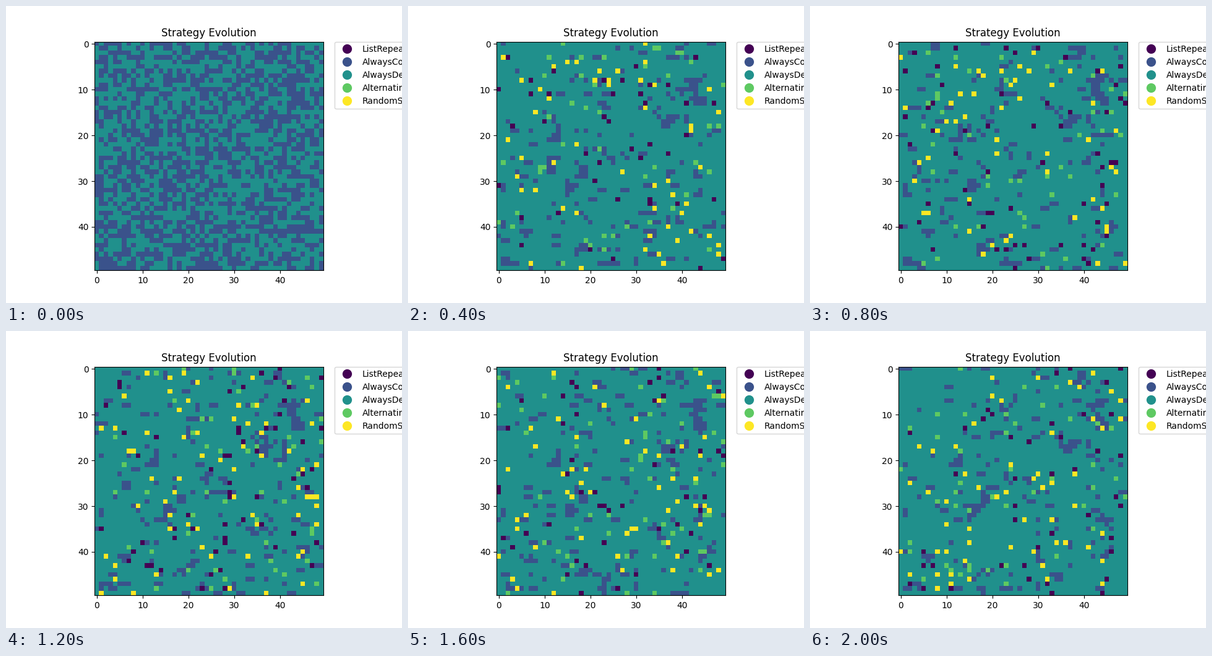
Write a matplotlib script that moves like this. It is 640 px wide and 480 px high and loops after 2.2 s.

```python
import numpy as np
import matplotlib.pyplot as plt
from matplotlib.animation import FuncAnimation

N, FRAMES = 50, 11
LIST, COOP, DEFECT, ALTER, RANDOM = range(5)
LABELS = ["ListRepeater", "AlwaysCooperate", "AlwaysDefect",
          "Alternating", "RandomStrategy"]

rng = np.random.default_rng(12)


def chance(p):
    return rng.random((N, N)) < p


def streaks(p):
    """Sparse cells, some of them widened to the right."""
    cells = chance(p)
    wide = cells & chance(0.45)
    cells[:, 1:] |= wide[:, :-1]
    return cells


def neighbours(cells):
    """How many of the eight cells around each one are set."""
    padded = np.pad(cells.astype(int), 1)
    block = sum(padded[r:r + N, c:c + N] for r in range(3) for c in range(3))
    return block - cells


def evolve():
    start = chance(0.48)
    support = neighbours(start)
    grids = [np.where(start, COOP, DEFECT)]
    for step in range(1, FRAMES):
        # Cooperators last only where enough of them stand together
        lasting = start & (support >= (5 if step == 1 else 6))
        coop = (lasting & chance(0.88)) | streaks(0.037)
        grid = np.where(coop, COOP, DEFECT)
        if step > 1:
            last = grids[-1]
            kept = (last != COOP) & (last != DEFECT) & chance(0.12)
            grid[kept] = last[kept]
        for kind in (LIST, ALTER, RANDOM):
            grid[chance(0.02)] = kind
        grids.append(grid)
    return grids


grids = evolve()

fig, ax = plt.subplots(figsize=(6.4, 4.8), dpi=100)
image = ax.imshow(grids[0], cmap="viridis", vmin=0, vmax=4)
ax.set_title("Strategy Evolution")

cmap = plt.get_cmap("viridis")
handles = [plt.Line2D([], [], marker="o", ls="", markersize=10,
                      color=cmap(i / 4), label=label)
           for i, label in enumerate(LABELS)]
ax.legend(handles=handles, bbox_to_anchor=(1.05, 1), loc="upper left",
          borderaxespad=0)


def update(step):
    image.set_data(grids[step])
    return [image]


anim = FuncAnimation(fig, update, frames=FRAMES, interval=200,
                     repeat=True, repeat_delay=0)
plt.show()
```
